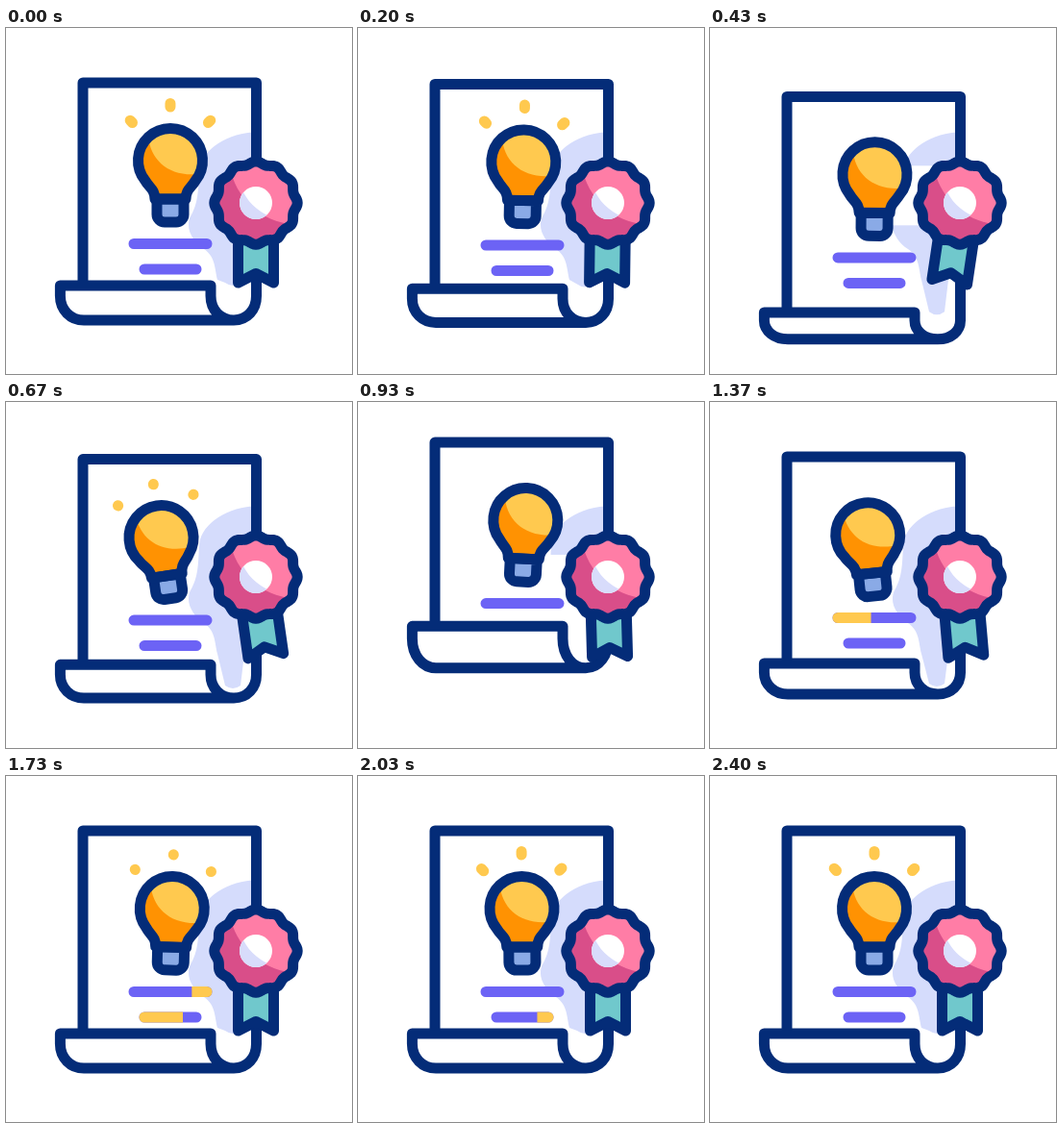
These frames come from a looping animation (360x360 px, 2430 ms). An HTML page:

```html
<!DOCTYPE html>
<html lang="en">
<head>
<meta charset="utf-8">
<title>Certificate</title>
<style>
  html, body { margin: 0; width: 100%; height: 100%; overflow: hidden; background: #fff; }
  svg { display: block; width: 100vw; height: 100vh; }
  .ink { fill: none; stroke: #042c78; stroke-width: 11; stroke-linejoin: round; stroke-linecap: round; }
  .bar { stroke: #6c63f5; stroke-width: 11; stroke-linecap: round; }
  .glow { stroke: #ffc94f; stroke-width: 11; stroke-linecap: round; }
</style>
</head>
<body>
<svg viewBox="0 0 360 360">
  <defs>
    <path id="glass" d="M155 178C155 168 149 166 145 159A33.500 33.500 0 1 1 197 159C193 166 187 168 187 178Z"/>
    <path id="base" d="M157 178H185V194a8 8 0 0 1 -8 8H165a8 8 0 0 1 -8 -8Z"/>
    <path id="seal"/>
    <clipPath id="glassClip"><use href="#glass"/></clipPath>
    <clipPath id="sealClip"><use href="#seal"/></clipPath>
    <clipPath id="coreClip"><circle cx="260" cy="182" r="17"/></clipPath>
    <clipPath id="sweepClip1"><rect id="sweep1" y="210" height="30"/></clipPath>
    <clipPath id="sweepClip2"><rect id="sweep2" y="236" height="30"/></clipPath>
    <clipPath id="sheetClip"><path id="sheet"/></clipPath>
  </defs>

  <g clip-path="url(#sheetClip)">
    <path id="shade" fill="#d5dcfc"/>
    <rect id="gap" x="180" width="80" fill="#fff"/>
  </g>

  <g id="bars">
    <path class="bar" d="M133 224.500H209M144 251H198"/>
    <path class="glow" d="M133 224.500H209" clip-path="url(#sweepClip1)"/>
    <path class="glow" d="M144 251H198" clip-path="url(#sweepClip2)"/>
  </g>

  <g id="bulb">
    <path id="rays" class="glow" fill="none"/>
    <use href="#base" fill="#8aaae6"/>
    <g clip-path="url(#glassClip)">
      <rect x="130" y="95" width="82" height="90" fill="#ff9202"/>
      <path d="M148 112C150 138 170 155 200 152H220V90H140Z" fill="#ffc94f"/>
    </g>
    <use href="#base" class="ink"/>
    <use href="#glass" class="ink"/>
  </g>

  <path id="curl" fill="#fff"/>
  <path id="outline" class="ink"/>

  <path id="ribbon" class="ink" style="fill:#70c8cc" d="M241.500 215V265L260 255.500L278.500 265V215Z"/>
  <g clip-path="url(#sealClip)">
    <rect x="210" y="130" width="100" height="100" fill="#ff7da6"/>
    <path d="M232 140C236 170 258 198 294 204V240H205V140Z" fill="#d94e89"/>
  </g>
  <circle cx="260" cy="182" r="17" fill="#fff"/>
  <path d="M244 164C250 180 260 190 278 198V204H240Z" fill="#d8dcfb" clip-path="url(#coreClip)"/>
  <use href="#seal" class="ink"/>
</svg>
<script>
const LOOP = 2430;
const { PI, sin, cos, exp, max, min, abs } = Math;
const $ = id => document.getElementById(id);
const set = (id, attrs) => { for (const k in attrs) $(id).setAttribute(k, attrs[k]); };

// Progress of t from a to b; ramp eases 0 to 1, bump rises to 1 and falls back
const part = (t, a, b) => min(1, max(0, (t - a) / (b - a)));
const ramp = (t, a, b) => (1 - cos(PI * part(t, a, b))) / 2;
const bump = (t, a, b) => sin(PI * part(t, a, b)) ** 2;

// The sheet is pulled down (1), then up (-1), then released (0)
const pullAt = t => ramp(t, 130, 475) - 2 * ramp(t, 475, 915) + ramp(t, 915, 1215);

function sealPath() {
  const points = Array.from({ length: 144 }, (_, i) => {
    const a = i * PI / 72, r = 41.8 + 1.4 * cos(12 * a);
    return (260 + r * cos(a)).toFixed(2) + " " + (182 + r * sin(a)).toFixed(2);
  });
  return "M" + points.join("L") + "Z";
}

function drawSheet(t, pull) {
  const top = 57 + 15 * pull;
  const foot = 304 + 24 * pull - 3.5 * pull * pull;
  const lip = 268 + 32 * pull - 3 * pull * pull + 4 * bump(t, 1080, 1640);
  const y1 = lip + (foot - lip) * 0.3, y2 = lip + (foot - lip) * 0.7;
  const inner = `C213 ${y2} 223 ${foot} 237 ${foot}`;
  const outer = `C251 ${foot} 260.500 ${y2} 260.500 ${y1}V${top}`;
  const left = `C67 ${foot} 56.400 ${y2} 56.400 ${y1}V${lip}`;
  const fold = `M56.400 ${lip}H213V${y1}${inner}`;
  set("curl", { d: `${fold}H81${left}Z` });
  set("outline", { d: `M80 ${lip}V${top}H260.500${fold}${outer}M237 ${foot}H81${left}` });
  set("sheet", { d: `M80 ${lip}V${foot}H237${outer}H80Z` });
}

function drawShade(t, pull) {
  const end = 268 + 38 * bump(t, 150, 950) + 28 * bump(t, 1100, 1640);
  set("shade", {
    d: `M262 108C232 109 204 125 201 148C200 170 200 182 192 196C186 208 194 222 206 230` +
       `C218 238 217 250 220 262L228 ${end - 3}Q236 ${end + 3} 244 ${end - 3}L248 262V240H262Z`
  });
  set("gap", { y: 151 - 8 * pull, height: abs(pull) > 0.8 ? 110 - 50 * pull : 0 });
}

function drawBulb(t, pull) {
  // Damped swing, leaning a little to the left
  const swing = 14.6 * exp(-t / 1780) * sin(PI * part(t, 0, 2100));
  const turn = -swing * (0.23 + 0.77 * cos(2 * PI * (t - 655) / 720));
  set("bulb", { transform: `translate(0 ${15 * pull}) rotate(${turn} 171 203)` });

  const k = 0.01 + 3.5 * (1 - ramp(t, 200, 340) + bump(t, 650, 870) + ramp(t, 1710, 1850));
  const s = k * 0.65;
  const lit = t < 330 || (t > 610 && t < 860) || t > 1660;
  set("rays", {
    d: `M171 82v${-k}M131.500 98.500l${-s} ${-s}M210.500 98.500l${s} ${-s}`,
    visibility: lit ? "visible" : "hidden"
  });
}

function sweep(id, t, from, to, start) {
  const head = from + (to - from) * ramp(t, start, start + 360);
  const tail = from + (to - from) * ramp(t, start + 300, start + 645);
  set(id, { x: tail, width: head - tail });
}

function draw(t) {
  const pull = pullAt(t);
  drawSheet(t, pull);
  drawShade(t, pull);
  drawBulb(t, pull);
  set("bars", { transform: `translate(0 ${15 * pull})` });
  sweep("sweep1", t, 127, 215, 1200);
  sweep("sweep2", t, 138, 204, 1505);
  const sway = 8.5 * bump(t, 150, 700) - 10 * bump(t, 480, 1000) - 5 * bump(t, 1110, 1640);
  set("ribbon", { transform: `rotate(${sway} 260 192)` });
}

set("seal", { d: sealPath() });
const start = performance.now();
function tick() {
  draw((performance.now() - start) % LOOP);
  requestAnimationFrame(tick);
}
tick();
</script>
</body>
</html>
```
